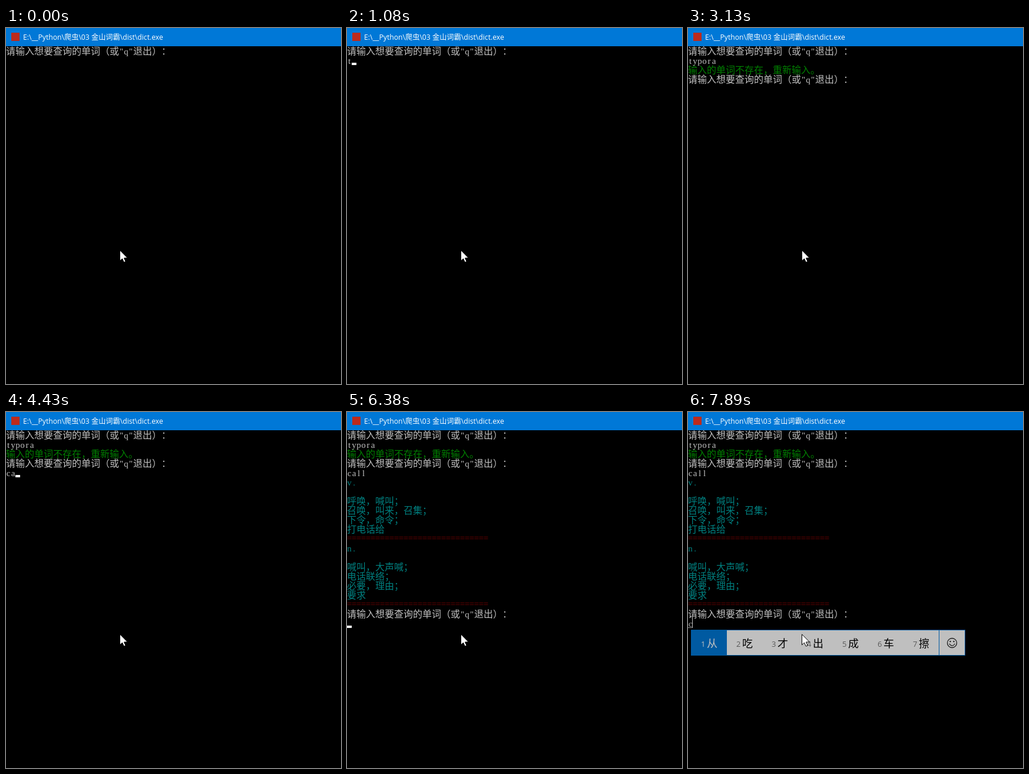
Write an HTML page with a canvas that moves like this. It is 569 px wide and 605 px high and loops after 8 s.

```html
<!DOCTYPE html>
<html lang="zh-CN">
<head>
<meta charset="utf-8">
<title>dict.exe</title>
<style>
  html, body { margin: 0; width: 100%; height: 100%; overflow: hidden; background: #000; }
  canvas { display: block; }
</style>
</head>
<body>
<canvas id="stage" width="569" height="605"></canvas>
<script>
const ctx = document.getElementById('stage').getContext('2d');
const LOOP = 8000, TOP = 31, CELL = 16;
const BLUE = '#0078d7', GREY = '#c0c0c0', GREEN = '#008000', TEAL = '#008080', RED = '#800000';
const HAN = '"Noto Sans CJK SC", "Noto Sans CJK", sans-serif';
const WIDE = `300 16px ${HAN}`;
const NARROW = '15px "Liberation Serif", serif';
const UI = `"Open Sans", ${HAN}`;

const PROMPT = '请输入想要查询的单词（或"q"退出）：';
const RULE = '='.repeat(30);

// Blocks of console output: start time, first row, lines with colours
const output = [
  [0, 0, [[PROMPT, GREY]]],
  [3130, 2, [['输入的单词不存在，重新输入。', GREEN], [PROMPT, GREY]]],
  [5720, 5, [
    ['v.', TEAL], ['', TEAL],
    ['呼唤，喊叫；', TEAL], ['召唤，叫来，召集；', TEAL], ['下令，命令；', TEAL], ['打电话给', TEAL],
    [RULE, RED],
    ['n.', TEAL], ['', TEAL],
    ['喊叫，大声喊；', TEAL], ['电话联络；', TEAL], ['必要，理由；', TEAL], ['要求', TEAL],
    [RULE, RED], [PROMPT, GREY]
  ]]
];

const inputs = [
  { row: 1, word: 'typora', keys: [1080, 1230, 1660, 1780, 2210, 2330] },
  { row: 4, word: 'call', keys: [4310, 4430, 4680, 4830] }
];

// Visible cursor spans: from, to, row
const cursors = [
  [150, 280, 1], [1080, 2580, 1], [2580, 2730, 2],
  [3720, 5260, 4], [5260, 5410, 5], [6380, 6940, 20], [7490, 7890, 20]
];

// Input method sessions
const sessions = [
  { from: 280, popup: 420, to: 1080, row: 1, letter: 't', picks: '他她太天图它听', shade: 0 },
  { from: 7890, popup: 7890, to: LOOP, row: 20, letter: 'c', picks: '从吃才出成车擦', shade: 0.25 }
];

const rowY = row => TOP + row * CELL;

function rect(x, y, w, h, color) {
  ctx.fillStyle = color;
  ctx.fillRect(x, y, w, h);
}

function label(text, x, y, font, color) {
  ctx.font = font;
  ctx.fillStyle = color;
  ctx.fillText(text, x, y);
}

// Half-width characters are centred in 8 px cells, full-width ones in 16 px;
// the equals sign sits in the middle of its row
function consoleText(text, row, color) {
  let x = 0;
  ctx.textAlign = 'center';
  for (const ch of text) {
    const narrow = ch.charCodeAt(0) < 128;
    const width = narrow ? 8 : 16;
    const baseline = rowY(row) + (ch === '=' ? 12 : 14);
    label(ch, x + width / 2, baseline, narrow ? NARROW : WIDE, color);
    x += width;
  }
  ctx.textAlign = 'left';
}

function titleBar() {
  rect(0, 0, 569, TOP, BLUE);
  rect(9, 8, 14, 14, '#bd2a1c');
  label('E:\\__Python\\爬虫\\03 金山词霸\\dist\\dict.exe', 29, 20, `12.2px ${UI}`, '#fff');
}

function smiley(x, y) {
  ctx.strokeStyle = '#222';
  ctx.lineWidth = 1.3;
  ctx.beginPath();
  ctx.arc(x, y, 8, 0, Math.PI * 2);
  ctx.stroke();
  ctx.beginPath();
  ctx.arc(x, y, 4.6, 0.25, Math.PI - 0.25);
  ctx.stroke();
  ctx.fillStyle = '#222';
  for (const side of [-3, 3]) {
    ctx.beginPath();
    ctx.arc(x + side, y - 2.5, 1.2, 0, Math.PI * 2);
    ctx.fill();
  }
}

function popup(y, picks, shade) {
  rect(5, y, 466, 44, BLUE);
  rect(66, y + 1, 360, 42, '#fff');
  rect(427, y + 1, 43, 42, '#fff');
  [...picks].forEach((pick, i) => {
    const x = 22 + i * 60;
    label(i + 1, x, y + 29, `13px ${UI}`, i ? '#767676' : '#fff');
    label(pick, x + 10, y + 30, `18px ${HAN}`, i ? '#000' : '#fff');
  });
  smiley(448.5, y + 22.5);
  rect(5, y, 466, 44, `rgba(0,0,0,${shade})`);
}

function compose(s, t) {
  const y = rowY(s.row);
  consoleText(s.letter, s.row, '#a0a0a0');
  rect(0, y + 15, 8, 1, '#909090');
  rect(7, y, 1, 16, GREY);
  if (t >= s.popup) popup(y + 19, s.picks, s.shade);
}

function pointer() {
  const shape = [[0, -0.7], [0, 17.3], [4, 13.5], [6.8, 19.5], [9.7, 18.5], [7, 12.5], [12.8, 12.3]];
  ctx.beginPath();
  shape.forEach(([x, y]) => ctx.lineTo(193.5 + x, 378.5 + y));
  ctx.closePath();
  ctx.fillStyle = '#fff';
  ctx.fill();
  ctx.strokeStyle = '#000';
  ctx.lineWidth = 1;
  ctx.stroke();
}

function draw(t) {
  rect(0, 0, 569, 605, '#000');
  titleBar();

  for (const [start, row, lines] of output) {
    if (t >= start) lines.forEach(([text, color], i) => consoleText(text, row + i, color));
  }

  const typed = {};
  for (const { row, word, keys } of inputs) {
    typed[row] = keys.filter(k => t >= k).length;
    consoleText(word.slice(0, typed[row]), row, GREY);
  }

  for (const [from, to, row] of cursors) {
    if (t >= from && t < to) rect((typed[row] || 0) * 8, rowY(row) + 12, 8, 4, '#fff');
  }

  for (const s of sessions) {
    if (t >= s.from && t < s.to) compose(s, t);
  }
  pointer();
}

const begin = performance.now();
function tick() {
  draw((performance.now() - begin) % LOOP);
  requestAnimationFrame(tick);
}
tick();
</script>
</body>
</html>
```
